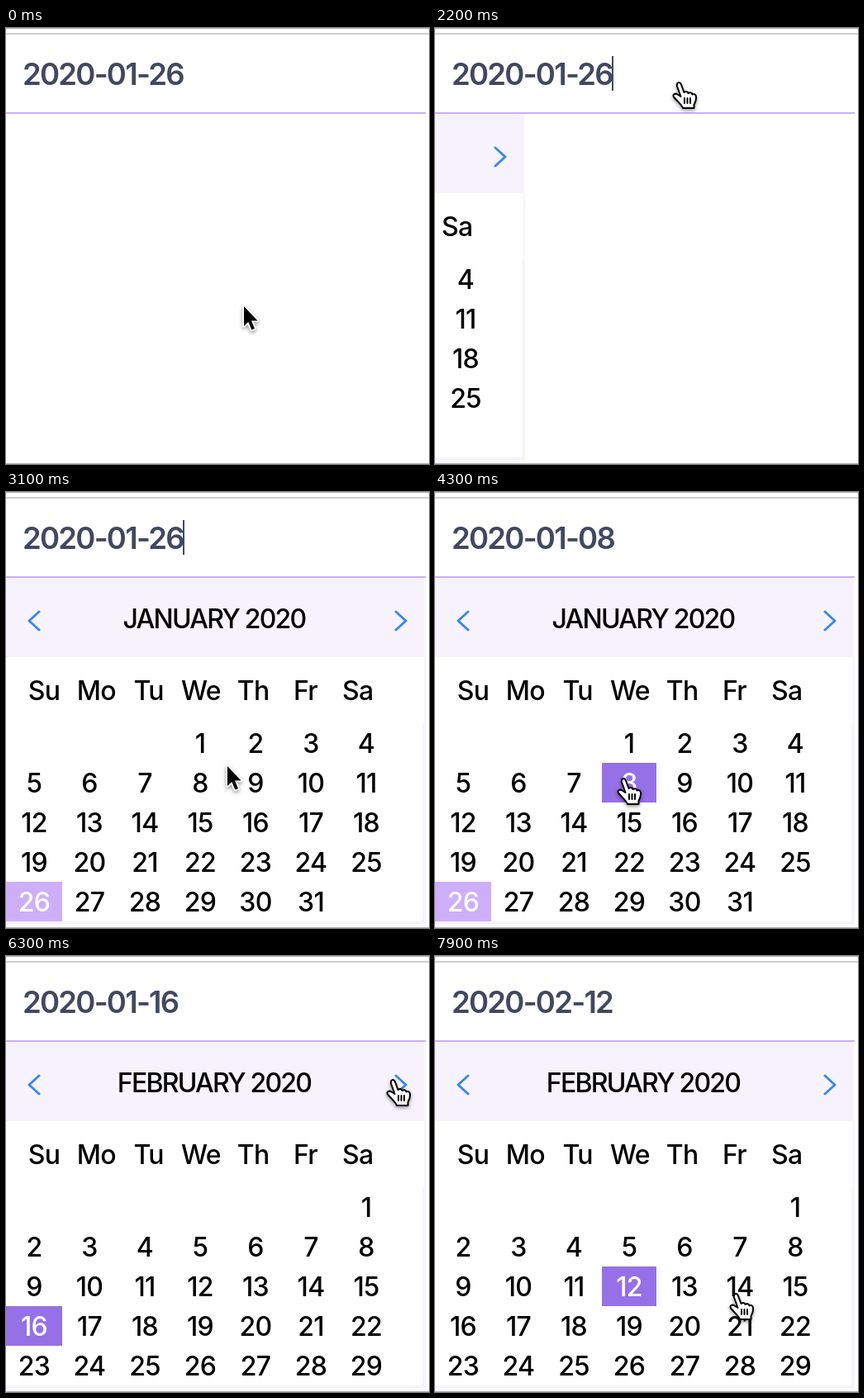
Recreate the animation shown at these times as an HTML page. Size 512 by 528 pixels, loop 8 s.

```html
<!DOCTYPE html>
<html lang="en">
<head>
<meta charset="utf-8">
<title>Date picker</title>
<style>
  html, body { margin: 0; width: 100%; height: 100%; overflow: hidden; background: #fff; }
  svg { display: block; font: 450 32px Inter, "Liberation Sans", sans-serif; letter-spacing: -.7px; }
  #date { font-size: 36.5px; font-weight: 570; letter-spacing: -1.75px; fill: #424860; }
  #title { letter-spacing: -1.75px; }
  #title, #week, #days { text-anchor: middle; }
  .tint { fill: #f6f3fd; }
  .chevron { fill: none; stroke: #3f86ea; stroke-width: 3; stroke-linecap: round; stroke-linejoin: round; }
  #cursor { filter: drop-shadow(0 2px 2px #0006); }
  #arrow { stroke: #fff; stroke-width: 3.6; paint-order: stroke; stroke-linejoin: round; }
  #hand { fill: #fff; stroke: #000; stroke-width: 2; stroke-linejoin: round; stroke-linecap: round; }
</style>
</head>
<body>
<svg width="512" height="528" viewBox="0 0 512 528">
  <path d="M0 .5H512M0 527.5H512" stroke="#b4b4b4"/>
  <path d="M0 7H512" stroke="#d0d0d0" stroke-width="2"/>
  <text id="date" x="20" y="69"></text>
  <path id="caret" d="M215 34V76" stroke="#424860" stroke-width="2"/>
  <g id="panel">
    <path class="tint" d="M0 104H507V200H508V524H0Z"/>
    <path fill="#fff" d="M0 200H506V280H504V520H0Z"/>
    <path class="chevron" d="M40 145L28 156 40 167M472 145L484 156 472 167"/>
    <text id="title" x="252" y="164.5"></text>
    <g id="week"></g>
    <g id="days"></g>
  </g>
  <path d="M0 103H508" stroke="#c8b0f6" stroke-width="2"/>
  <g id="cursor">
    <path id="arrow" d="M0 0V24L5.3 19 9.4 28.5 13 27 9 17.5H16.5Z"/>
    <path id="hand" d="M2.5 17L-2 4.5C-3-.5 1.5-1.5 3 2.5L6.5 12C8 10 11 11 11.5 13 13 11.5 16 12 16.5 14.5 19 13 21 15 21 17.5 21.5 21.5 20 24.5 18.5 27V31H5C4 27.5 0 24.5-6 17.5-8 14.5-4 12.5-1.5 14.5ZM7 19V25M10.5 19V25M14 19V25"/>
  </g>
</svg>
<script>
const LOOP = 8000, STEP = 100;
const FOCUS = 2000, OPENED = 2500, OVER_DAYS = 3500, NEXT_MONTH = 6300;
const $ = id => document.getElementById(id);
const mix = (a, b, k) => a + (b - a) * k;

// Pointer moves: each is an arc through `via`, with a rest until the next one
const home = [288, 337];
const moves = [
  { from: 0, to: 600, via: [74, 65], end: [391, 399] },
  { from: 1000, to: 1600, via: [48, 60], end: [295, 66] },
  { from: 2700, to: 3500, via: [268, 332], end: [228, 347] },
  { from: 4300, to: 4700, via: [40, 60], end: [303, 415] },
  { from: 5500, to: 6100, via: [40, 60], end: [468, 150] },
  { from: 6400, to: 7000, via: [60, 60], end: [239, 389] },
  { from: 7600, to: 7900, via: [300, 400], end: [364, 409] }
];

// Clicks that choose a day
const picks = [
  { at: 0, month: 1, day: 26 },
  { at: 3800, month: 1, day: 8 },
  { at: 5000, month: 1, day: 16 },
  { at: 7400, month: 2, day: 12 }
];

function pointerAt(t) {
  const i = moves.findLastIndex(m => m.from <= t);
  const { from, to, via, end } = moves[i];
  const begin = i ? moves[i - 1].end : home;
  const k = Math.min(1, (t - from) / (to - from));
  const bend = Math.sin(Math.PI * k);
  return end.map((e, axis) =>
    mix(begin[axis], e, k) + bend * (via[axis] - (begin[axis] + e) / 2));
}

// Cell edges fall on whole device pixels of a 2x display
const edge = col => Math.round(67 * col / 2) * 2;

function dayCells(year, month, colors) {
  const first = new Date(year, month - 1, 1).getDay();
  const count = new Date(year, month, 0).getDate();
  let out = "";
  for (let day = 1; day <= count; day++) {
    const cell = first + day - 1, col = cell % 7, top = 280 + 48 * Math.floor(cell / 7);
    const color = colors[day];
    if (color) out += `<rect x="${edge(col)}" y="${top}" width="${edge(col + 1) - edge(col)}" height="48" fill="${color}"/>`;
    out += `<text x="${34 + 67 * col}" y="${top + 36}" fill="${color ? "#fff" : "#000"}">${day}</text>`;
  }
  return out;
}

function render(t) {
  const { month, day } = picks.findLast(p => p.at <= t);
  const shownMonth = t < NEXT_MONTH ? 1 : 2;
  const two = n => String(n).padStart(2, "0");
  $("date").textContent = `2020-${two(month)}-${two(day)}`;
  $("title").textContent = (shownMonth === 1 ? "JANUARY" : "FEBRUARY") + " 2020";
  const colors = { [day]: "#9670e6" };
  if (shownMonth === 1) colors[26] = "#cdaff9";
  $("days").innerHTML = dayCells(2020, shownMonth, colors);

  const slide = Math.min(0, (t - OPENED) * 1.33);
  $("panel").setAttribute("transform", `translate(${slide})`);
  const caretOn = t >= FOCUS && t < OVER_DAYS && t % 1000 < 500;
  $("caret").style.display = caretOn ? "" : "none";

  const [x, y] = pointerAt(t);
  const hand = y < 102 || t >= OVER_DAYS;
  $("cursor").setAttribute("transform", `translate(${x} ${y})`);
  $("hand").style.display = hand ? "" : "none";
  $("arrow").style.display = hand ? "none" : "";
}

$("week").innerHTML = ["Su", "Mo", "Tu", "We", "Th", "Fr", "Sa"]
  .map((name, i) => `<text x="${46 + 63.3 * i}" y="252">${name}</text>`).join("");

const start = performance.now();
let shown = -1;
function tick() {
  const t = Math.floor((performance.now() - start) % LOOP / STEP) * STEP;
  if (t !== shown) render(shown = t);
  requestAnimationFrame(tick);
}
tick();
</script>
</body>
</html>
```
